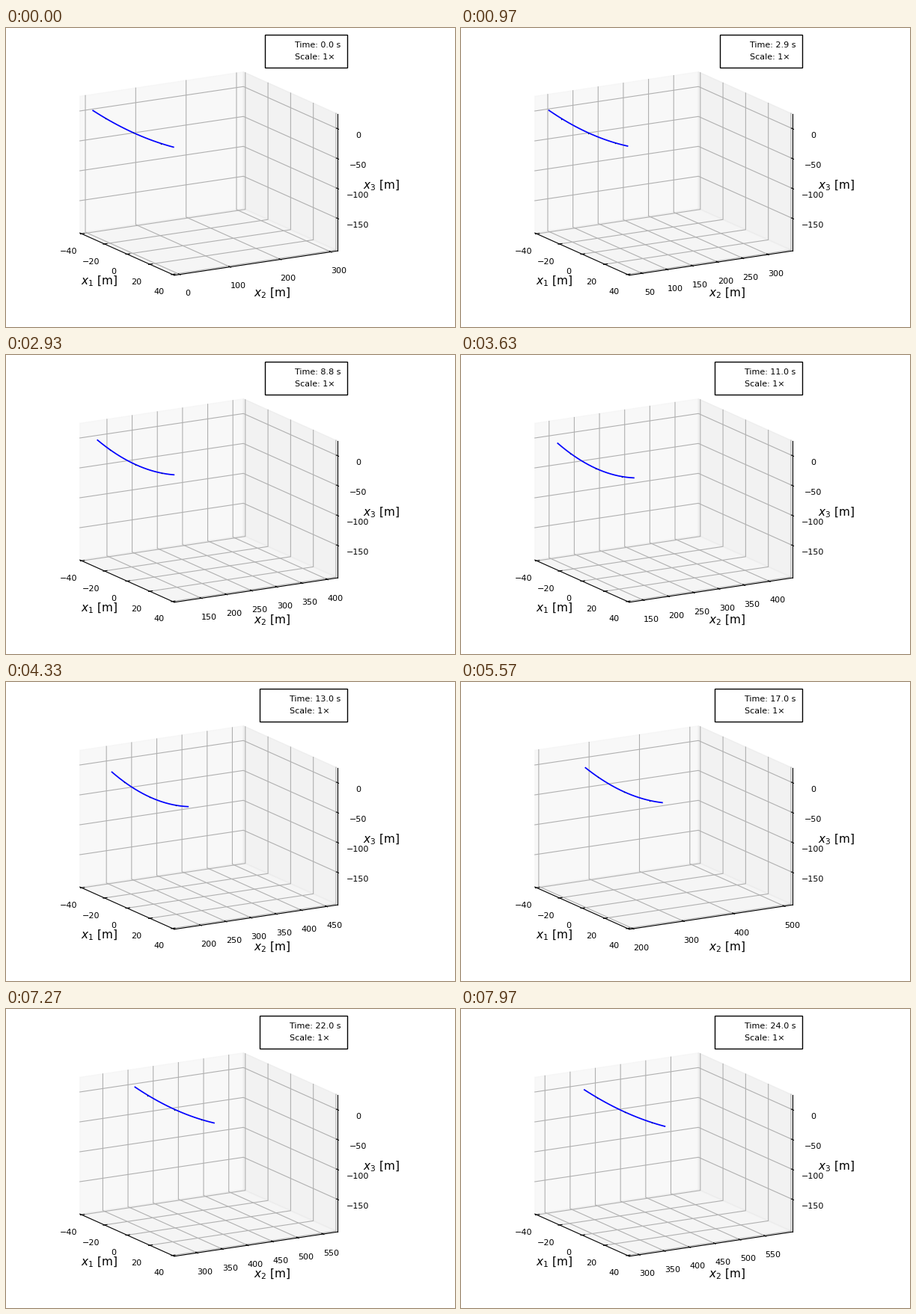
A matplotlib script that plays this animation: 600x400 px, repeating every 8000 ms.

```python
import numpy as np
import matplotlib
import matplotlib.pyplot as plt
from matplotlib.animation import FuncAnimation
from matplotlib.collections import LineCollection
from matplotlib.patches import Polygon, Rectangle

matplotlib.rcParams["font.family"] = "DejaVu Sans"

STEPS = 240              # simulation steps of 0.1 s in one loop
SUB = 2                  # drawn frames per simulation step
LOOP = 8000              # ms
MARGIN = 1 / 48          # pane overhang relative to the data range
SPAN = 311.7             # visible x2 range in metres
SPEED = 12.17            # x2 window speed in m/s

# Orthographic view: azimuth -30 deg, elevation 15 deg, box 4:4:3
SIZE = 252.4
AZ, EL = np.radians(30), np.radians(15)
ORIGIN = np.array([98.7, 274.2])
E1 = SIZE * np.array([np.sin(AZ), np.sin(EL) * np.cos(AZ)])
E2 = SIZE * np.array([np.cos(AZ), -np.sin(EL) * np.sin(AZ)])
E3 = SIZE * np.array([0, -0.75 * np.cos(EL)])


def proj(a, b, c):
    """Unit box coordinates to pixels."""
    return ORIGIN + a * E1 + b * E2 + c * E3


def unit(v, lo, span):
    return (MARGIN + (v - lo) / span) / (1 + 2 * MARGIN)


def bump(t, centre, width, power=2):
    """Smooth hill of height 1."""
    return np.exp(-np.abs((t - centre) / width) ** power)


fig = plt.figure(figsize=(6, 4), dpi=100, facecolor="white")
ax = fig.add_axes([0, 0, 1, 1])
ax.set_xlim(0, 600)
ax.set_ylim(400, 0)
ax.axis("off")


def pane(corner, u, v, shade):
    pts = [corner, corner + u, corner + u + v, corner + v]
    ax.add_patch(Polygon(pts, alpha=0.5, facecolor=str(shade),
                         edgecolor=str(shade), lw=1, zorder=1))


pane(ORIGIN, E2, E3, 0.95)
pane(ORIGIN + E2, E1, E3, 0.90)
pane(ORIGIN, E1, E2, 0.925)


def label(x, y, s, size=8, ha="center"):
    return ax.text(x, y, s, fontsize=size, ha=ha, va="baseline",
                   color="black", zorder=6)


def number(v):
    return str(v).replace("-", "\u2212")


def tick(p, direction):
    d = direction / (1 + 2 * MARGIN) / 12
    return [p - 0.2 * d, p + 0.1 * d]


def strokes(segments, color, zorder):
    lines = LineCollection(segments, colors=color, linewidths=0.8,
                           capstyle="projecting", zorder=zorder)
    return ax.add_collection(lines)


# Fixed grid, ticks and labels of x1 and x3
grid, marks = [], []
for v in range(-40, 41, 20):
    u = unit(v, -40, 80)
    p = proj(u, 0, 0)
    grid.append([p, proj(u, 1, 0), proj(u, 1, 1)])
    marks.append(tick(p, -E2))
    label(p[0] - 17.6, p[1] + 26.8, number(v))
for v in range(0, -151, -50):
    u = (ORIGIN[1] - 111 + 0.8 * v) / -E3[1]
    p = proj(1, 1, u)
    grid.append([proj(0, 0, u), proj(0, 1, u), p])
    marks.append(tick(p, E1))
    label(470.3, p[1] + 11.8, number(v))

strokes(grid, "#b0b0b0", 2)
strokes(marks, "black", 4)
moving_grid = strokes([], "#b0b0b0", 2)
moving_marks = strokes([], "black", 4)

start = ORIGIN
for edge in (E1, E2, E3):
    end = start + edge
    ax.plot(*zip(start, end), color="black", lw=0.8, zorder=3)
    start = end

label(125, 343.3, "$x_1$ [m]", 11)
label(356, 359.8, "$x_2$ [m]", 11)
label(502, 215.8, "$x_3$ [m]", 11)
x2_labels = [label(0, 0, "") for _ in range(7)]

# Legend
box = Rectangle((346, 9), 110, 44, facecolor="white", edgecolor="black",
                lw=1, zorder=5)
ax.add_patch(box)
time_text = label(386, 25.6, "", ha="left")
scale_text = label(386, 41.6, "Scale: 1\u00d7", ha="left")

cable, = ax.plot([], [], color="blue", lw=1.25, zorder=7)
dots, = ax.plot([], [], ls="none", marker="o", ms=1.1, mew=0,
                color="#002060", zorder=8)
U_LINE = np.linspace(-1, 1, 21)
U_DOTS = np.array([-0.68, 0, 0.68])


def curve(u, t):
    """Sagging cable on screen, u from -1 to 1."""
    x = 170 + 56 * bump(t, 20.4, 7.66, 2.5)
    y = 140 + 14 * bump(t, 13, 4.88) - 7 * bump(t, 20.8, 3)
    half = 50.8 + 3 * (t / 12 - 1) ** 2
    sag = 4.5 + 6 * bump(t, 12, 8)
    return x + half * u, y + 0.455 * half * u - sag * u ** 2


def x2_ticks(lo):
    """Steps of 100 where four of them fit, otherwise steps of 50."""
    for step in (100, 50):
        first = int(np.ceil(lo / step)) * step
        ticks = range(first, int(lo + SPAN) + 1, step)
        if len(ticks) >= 4:
            return ticks


def draw(frame):
    # Each step is centred on its nominal moment
    t = min((frame + 1) // SUB, STEPS - 1) / 10
    lo = -4.4 + SPEED * t

    lines, short = [], []
    for text in x2_labels:
        text.set_text("")
    for v, text in zip(x2_ticks(lo), x2_labels):
        u = unit(v, lo, SPAN)
        p = proj(1, u, 0)
        lines.append([p, proj(0, u, 0), proj(0, u, 1)])
        short.append(tick(p, E1))
        text.set_text(number(v))
        text.set_position((p[0] + 10.3, p[1] + 28.7))
    moving_grid.set_segments(lines)
    moving_marks.set_segments(short)

    # The clock shows two significant digits
    wide = t >= 10
    time_text.set_text(f"Time: {round(t) if wide else t:.1f} s")
    shift = 7 if wide else 0
    box.set_x(346 - shift)
    box.set_width(110 + shift)
    for text in (time_text, scale_text):
        text.set_x(386 - shift)

    cable.set_data(*curve(U_LINE, t))
    x, y = curve(U_DOTS, t)
    dots.set_data(x, y + 0.4)
    return []


anim = FuncAnimation(fig, draw, frames=STEPS * SUB,
                     interval=LOOP / (STEPS * SUB),
                     init_func=lambda: draw(0), repeat=True, repeat_delay=0,
                     blit=False)
plt.show()
```
